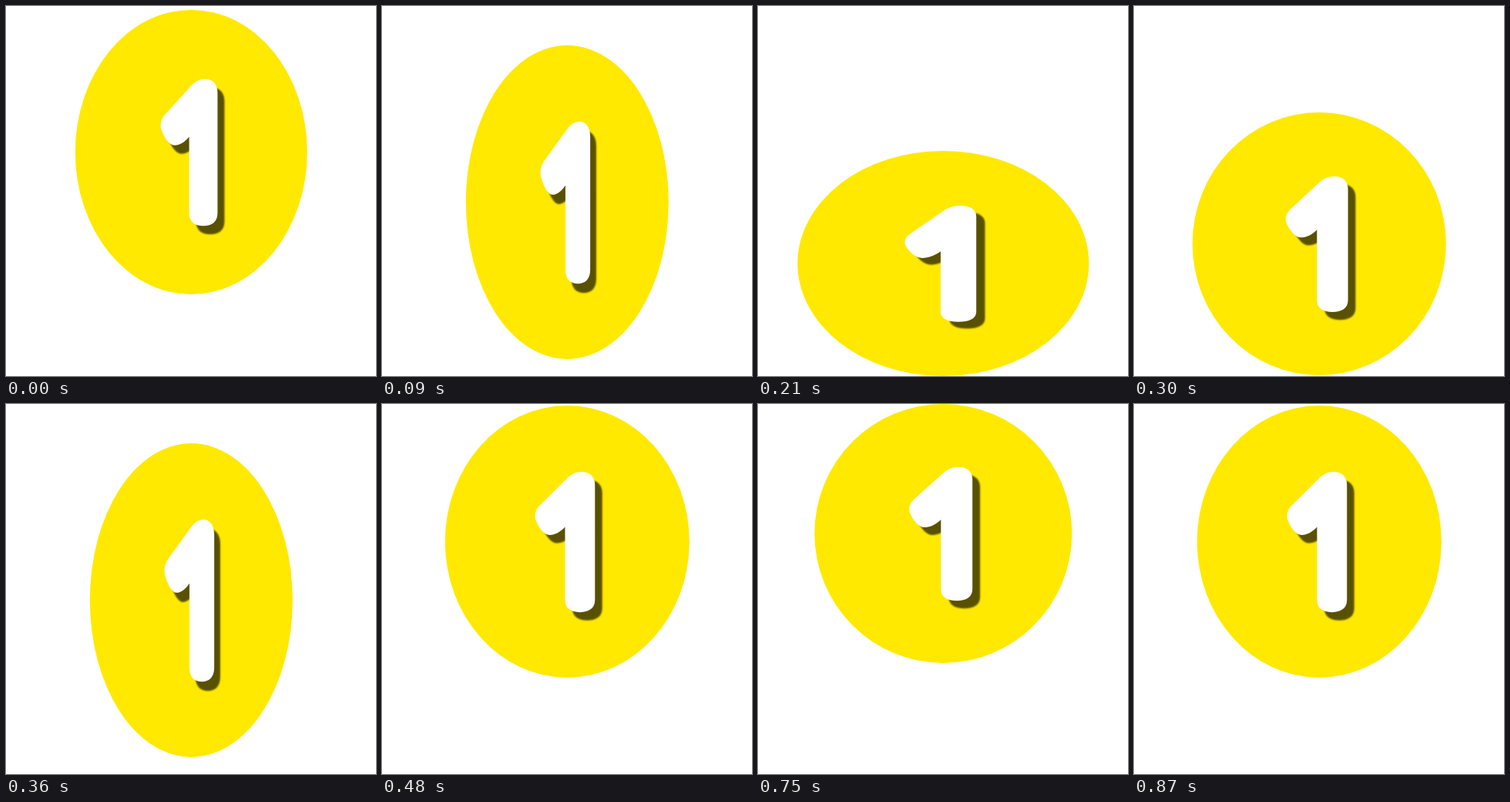
Recreate the animation shown at these times as an HTML page with a canvas. Size 480x480 px, loop 0.9 s.

```html
<!DOCTYPE html>
<html lang="en">
<head>
<meta charset="utf-8">
<title>Bouncing ball</title>
<style>
  html, body { margin: 0; width: 100%; height: 100%; overflow: hidden; background: #fff; }
  canvas { display: block; }
</style>
</head>
<body>
<canvas id="stage" width="480" height="480"></canvas>
<script>
const ctx = document.getElementById("stage").getContext("2d");
const STEP = 30, STEPS = 30, APEX = 22.5;
const SIZE = 335, FLOOR = 480, CENTER_X = 240.3;

// Steps away from the apex, top edge, bottom edge
const KEYS = [
  [0.5, 0, 335], [2.5, 0, 336], [4.5, 1, 339], [6.5, 2, 355], [7.5, 5, 374],
  [9, 18, 420], [10.5, 51, 458], [12.5, 138, 479], [14.5, 188, 480]
];

const digit = new Path2D(`M-3 -18 L-3 72 C-3 82 5 87 17.5 87 C30 87 38 82 38 72
  L38 -70 C38 -80 31 -86 20 -86 C12 -86 6 -83 1 -79
  L-37 -45 C-43 -40 -46 -33 -43 -26 C-39 -17 -32 -8 -24 -8 C-17 -8 -9 -12 -3 -18 Z`);

function slope(i, column) {
  const before = KEYS[i - 1], after = KEYS[i + 1];
  return before && after ? (after[column] - before[column]) / (after[0] - before[0]) : 0;
}

// Cubic Hermite curve through the keys
function edgeAt(distance, column) {
  let i = 0;
  while (i < KEYS.length - 2 && distance > KEYS[i + 1][0]) i++;
  const from = KEYS[i], to = KEYS[i + 1];
  const span = to[0] - from[0];
  const u = (distance - from[0]) / span, v = 1 - u;
  return from[column] * v * v * (1 + 2 * u) + to[column] * u * u * (1 + 2 * v)
    + span * u * v * (slope(i, column) * v - slope(i + 1, column) * u);
}

function draw(time) {
  const step = Math.floor((time + 1) / STEP) % STEPS;
  const gap = Math.abs(step - APEX);
  const distance = Math.min(gap, STEPS - gap);
  const top = edgeAt(distance, 1);
  const bottom = Math.min(edgeAt(distance, 2), FLOOR);
  const height = bottom - top;
  const width = 2 * SIZE - height;
  const scaleX = width / SIZE, scaleY = height / SIZE;

  ctx.fillStyle = "#fff";
  ctx.fillRect(0, 0, 480, 480);
  ctx.save();
  ctx.translate(CENTER_X, (top + bottom) / 2);
  ctx.scale(scaleX, scaleY);

  ctx.fillStyle = "#ffe900";
  ctx.beginPath();
  ctx.arc(0, 0, SIZE / 2, 0, 2 * Math.PI);
  ctx.fill();

  ctx.shadowColor = "rgba(0, 0, 0, 0.65)";
  ctx.shadowBlur = 2;
  ctx.shadowOffsetX = 10 * scaleX;
  ctx.shadowOffsetY = 10 * scaleY;
  ctx.fillStyle = "#fff";
  ctx.fill(digit);
  ctx.restore();
}

const start = performance.now();
function tick() {
  draw(performance.now() - start);
  requestAnimationFrame(tick);
}
tick();
</script>
</body>
</html>
```
